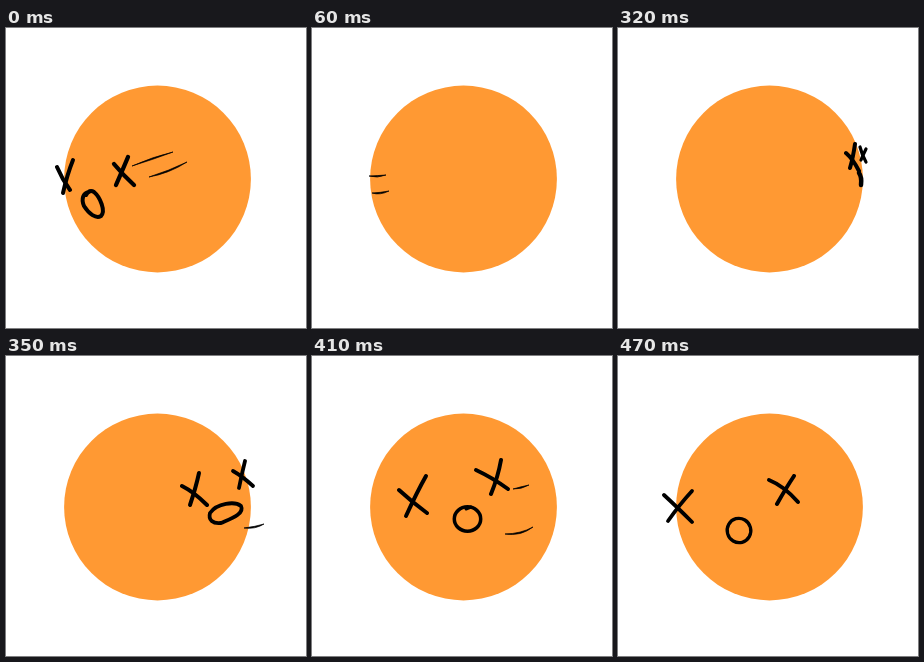
Animation of 300x300 px, one loop 0.5 s. Source, as an HTML page:

```html
<!DOCTYPE html>
<html lang="en">
<head>
<meta charset="utf-8">
<title>Spinning face</title>
<style>
html, body { margin: 0; width: 100%; height: 100%; overflow: hidden; background: #fff; }
svg { display: block; width: 100vw; height: 100vh; }
.ink { fill: none; stroke: #000; stroke-linecap: round; stroke-linejoin: round; }
.pose { opacity: 0; }
</style>
</head>
<body>
<svg id="stage" viewBox="0 0 300 300">
  <circle cx="151.5" cy="151" r="93.4" fill="#ff9933"/>
</svg>
<script>
const LOOP = 500;
const stage = document.getElementById('stage');

const ink = (d, width = 4) => `<path class="ink" d="${d}" stroke-width="${width}"/>`;

// Two slightly bowed strokes crossing each other
const cross = (a, b, width = 4) => ink(a, width) + ink(b, width);

const ring = (x, y, rx, ry, turn = 0, width = 3.5) =>
  `<ellipse class="ink" cx="${x}" cy="${y}" rx="${rx}" ry="${ry}"
    transform="rotate(${turn} ${x} ${y})" stroke-width="${width}"/>`;

// Thin speed line, pointed at both ends
const streak = (x1, y1, cx, cy, x2, y2) =>
  `<path d="M${x1} ${y1}Q${cx} ${cy - 1.3} ${x2} ${y2}Q${cx} ${cy + 1.5} ${x1} ${y1}Z"
    stroke="#000" stroke-width=".7" stroke-linejoin="round"/>`;

// [start, end, drawing]
const poses = [
  [0, 30,
    cross('M67 132Q61 147 57 165', 'M51 139Q56 151 64 162') +
    cross('M122 129Q117 141 110 157', 'M108 136Q117 147 128 157', 4.3) +
    ink('M83 164C77 165 75 171 78 178C83 186 90 191 95 188C100 183 94 169 88 164C85 162 82 163 80 167', 4) +
    streak(126, 138, 147, 130, 167, 124) +
    streak(143, 149, 163, 144, 181, 134)],
  [30, 60,
    cross('M54 141L56 154', 'M57 144L55 154', 3.5) +
    cross('M71 131Q68 147 69 165', 'M68 136Q70 153 75 168', 3.8) +
    ink('M62 164Q64 177 70 189', 7.5) +
    streak(80, 146, 98, 147, 115, 144) +
    streak(82, 164, 105, 166, 120, 160)],
  [60, 90,
    streak(57, 148, 65, 149, 74, 147) +
    streak(60, 165, 68, 166, 77, 163)],
  [320, 350,
    cross('M237 116Q235 130 232 140', 'M228 125Q235 131 241 143', 4) +
    cross('M242 119Q244 127 248 134', 'M248 121Q245 127 243 132', 3.2) +
    ink('M241 145Q244 149 243 157', 4.5)],
  [350, 380,
    cross('M193 117Q190 131 184 149', 'M176 130Q188 136 201 149') +
    cross('M239 105Q236 117 233 132', 'M227 115Q236 120 247 130', 3.8) +
    ink('M204 157C211 147 229 145 235 150C239 158 224 163 215 167C207 168 202 164 204 157Z', 3.8) +
    streak(238, 172, 249, 172, 258, 168)],
  [380, 410,
    cross('M145 119Q140 135 134 152', 'M124 134Q140 146 156 152') +
    cross('M226 99Q221 113 216 128', 'M210 111Q223 120 234 125', 3.8) +
    ink('M178 151C186 143 215 144 218 154C219 164 200 164 191 170C181 173 156 173 156 168C160 160 172 151 190 150', 3.8) +
    streak(243, 113, 233, 129, 209, 129) +
    streak(209, 173, 230, 174, 248, 171)],
  [410, 440,
    cross('M114 120Q105 136 94 160', 'M87 134Q100 146 115 157') +
    cross('M189 104Q186 121 179 138', 'M164 114Q181 122 196 133') +
    ring(155.5, 163, 13.2, 12.2) + ink('M154 153L159 151', 3) +
    streak(201, 133, 209, 132, 217, 129) +
    streak(193, 178, 209, 179, 221, 171)],
  [440, 470,
    cross('M94 127Q84 142 72 163', 'M66 137Q79 148 94 162') +
    cross('M183 112Q178 126 169 143', 'M157 119Q173 127 188 140') +
    ring(138, 168, 12.4, 12.4)],
  [470, 500,
    cross('M74 135Q62 148 50 165', 'M46 139Q59 151 74 166', 3.8) +
    cross('M176 120Q168 132 159 148', 'M151 124Q166 130 180 146', 4) +
    ring(121, 174.5, 11.8, 12.2, -15, 3.3)]
];

for (const [from, to, drawing] of poses) {
  const group = document.createElementNS('http://www.w3.org/2000/svg', 'g');
  group.setAttribute('class', 'pose');
  group.innerHTML = drawing;
  stage.append(group);
  group.animate([
    { offset: 0, opacity: from ? 0 : 1, easing: 'step-end' },
    { offset: from / LOOP, opacity: 1, easing: 'step-end' },
    { offset: to / LOOP, opacity: 0, easing: 'step-end' },
    { offset: 1, opacity: 0 }
  ], { duration: LOOP, iterations: Infinity });
}
</script>
</body>
</html>
```
